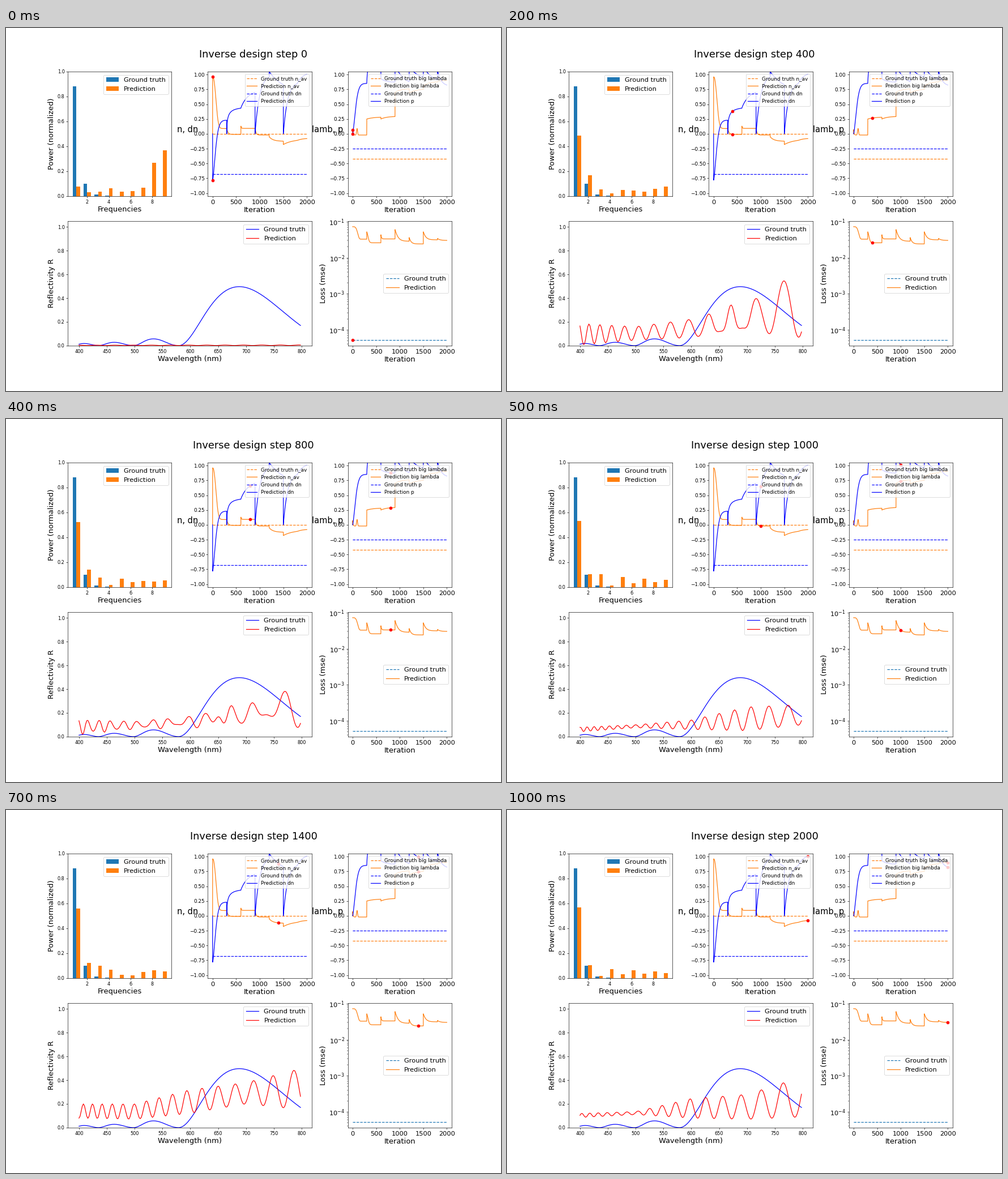
Animation of 874 by 641 pixels, one loop 1100 ms. Source, as a matplotlib script:

```python
import numpy as np
import matplotlib.pyplot as plt
from matplotlib.animation import FuncAnimation

plt.rcParams["font.family"] = "DejaVu Sans"
ORANGE, BLUE = "tab:orange", "blue"
GT_LOSS = 5.25e-5
WAVE = np.arange(400, 800, 2.0)
KNOTS = [400, 500, 600, 700, 800]
FREQ = np.arange(1, 10)
BAR = 0.35
ITER = np.arange(2001)
RESTART = 300


def lobes():
    """Reflectivity of the true grating: squared sines between its zeros."""
    zeros = np.array([897, 579, 498, 435, 388.0])
    turn = np.interp(WAVE ** -2, zeros ** -2, range(5))
    peak = np.array([.497, .057, .028, .018])[turn.astype(int)]
    s = np.sin(np.pi * turn) ** 2
    return peak * 1.15 * s / (1 + .15 * s)


def fringes(low, high, first, last, count, p, beat=0):
    """Thin-film fringes between two envelopes, `count` orders from first to last."""
    order = count * (WAVE ** -p - last ** -p) / (first ** -p - last ** -p)
    lo, hi = np.interp(WAVE, KNOTS, low), np.interp(WAVE, KNOTS, high)
    window = beat * np.exp(-((WAVE - 675) / 35) ** 2)
    return (lo + (hi - lo) * np.cos(np.pi * order) ** 2
            + window * np.cos(4 * np.pi * order))


def spread(first, second, swing, peak, period):
    """Two leading powers; the rest is shared out with a fading ripple."""
    k = FREQ[2:]
    ripple = np.cos(2 * np.pi * (k - peak) / period) * np.exp((3 - k) / 4)
    return np.r_[first, second, (1 - first - second) / 7 + swing * ripple]


def relax(*stages):
    """Each restart decays from start to end: (start, end, time, power)."""
    stage = np.maximum(ITER - 1, 0) // RESTART
    t = np.maximum(ITER - 1, 0) % RESTART
    start, end, tau, power = np.array([(*s, 1)[:4] for s in stages])[stage].T
    return end + (start - end) * np.exp(-(t / tau) ** power)


truth = lobes()
spectra = {
    0: .001 + .005 * np.sin((WAVE - 415) / 10.5) ** 2 * WAVE / 800,
    200: fringes([.03, .01, .02, .045, .12], [.08, .16, .235, .36, .72],
                 402, 764, 12, .7),
    600: fringes([-.01, .05, .08, .14, .05], [.22, .165, .22, .33, .64],
                 416, 766, 11, .7, .05),
    1000: fringes([.04, .075, .06, .05, .1], [.08, .1, .14, .25, .27],
                  600, 774, 6, .7),
    1400: fringes([.08, .07, .12, .2, .15], [.2, .2, .32, .38, .5],
                  408, 786, 15, .35),
    1600: fringes([.03, .065, .07, .09, .085], [.12, .11, .14, .23, .28],
                  416, 771, 13, -.7),
    2000: fringes([.085, .11, .08, .07, .09], [.12, .135, .245, .28, .43],
                  417.6, 765, 14, .7),
}
powers = {
    0: (.045 + .03 * np.cos(2 * np.pi * (FREQ - 1) / 3) * np.exp((1 - FREQ) / 6)
        + .33 / (1 + np.exp(-4 * (FREQ - 7.8)))),
    200: .02 + .36 * .3 ** (FREQ - 1) + .175 * .42 ** (9 - FREQ),
    600: spread(.51, .18, .03, 5.4, 3),
    1000: spread(.532, .103, .05, 3, 2.1),
    1400: spread(.558, .12, .055, 3.2, 5),
    1600: spread(.59, .07, .05, 5.1, 2.5),
    2000: spread(.566, .103, .03, 4, 2),
}
for step, a, b, w in [(400, 200, 600, .8), (800, 600, 1000, .5),
                      (1200, 1000, 1400, .2), (1800, 1600, 2000, .25)]:
    for d in (spectra, powers):
        d[step] = (1 - w) * d[a] + w * d[b]

n_av = relax((.96, .09, 88, 2.4), (.09, -.01, 25), (.13, .092, 10),
             (.1, -.02, 20), (-.05, -.125, 80), (-.18, -.09, 200),
             (-.11, -.075, 100))
dn = relax((-.78, .23, 80, 1.5), (0, .45, 29, .5), (.44, .74, 150),
           (0, 1, 95), (1.05, .7, 300), (0, .88, 90), (.86, 1.04, 120))
lamb = relax((.07, -.02, 10), (.25, .285, 150), (.25, .295, 120),
             (.7, .77, 150), (.69, .76, 150), (.8, .88, 100), (.88, .9, 60))
lamb += .11 * np.exp(-((ITER - 95) / 15) ** 2)
p = relax((0, .85, 80, 1.5), (.85, 1.15, 15), (.93, .87, 100), (1.15, .8, 200),
          (1.15, .93, 150), (1.15, .88, 150), (1.07, .8, 80))
loss = relax((.072, .0325, 108, 4), (.052, .0258, 32, 1.5), (.043, .033, 12),
             (.06, .0285, 50), (.036, .024, 35), (.052, .0312, 45),
             (.034, .03, 50))
for curve in (n_av, dn, lamb, p):
    curve[0] = 0

fig = plt.figure(figsize=(15, 11), dpi=58.274, facecolor="white")
grid = fig.add_gridspec(2, 3, left=.125, right=.9, bottom=.125, top=.88,
                        wspace=.35, hspace=.2)
title = fig.suptitle("", fontsize=22, y=.94)


def panel(cell, xlabel, ylabel, **ylabel_style):
    ax = fig.add_subplot(cell)
    ax.set_xlabel(xlabel, fontsize=16, labelpad=2.5)
    ax.set_ylabel(ylabel, **{"fontsize": 16, **ylabel_style})
    return ax


def iteration_axis(ax):
    ax.set_xlim(-100, 2100)
    ax.set_xticks(range(0, 2001, 500))
    ax.tick_params(axis="x", labelsize=14)


def history(cell, ylabel, series):
    """Panel with (name, curve, true value, color) for two parameters."""
    ax = panel(cell, "Iteration", ylabel, fontsize=18, rotation=0)
    for name, curve, true, color in series:
        ax.plot([0, 2000], [true, true], "--", color=color,
                label="Ground truth " + name)
        ax.plot(ITER, curve, color=color, label="Prediction " + name)
    iteration_axis(ax)
    ax.set_ylim(-1.05, 1.05)
    ax.set_yticks(np.linspace(-1, 1, 9))
    ax.tick_params(axis="y", labelsize=11)
    ax.legend(loc="upper right", fontsize=11)
    return [ax.plot([], [], "ro")[0] for _ in series]


ax = panel(grid[0, 0], "Frequencies", "Power (normalized)")
ax.bar(FREQ - BAR / 2, np.maximum(.88 * .113 ** (FREQ - 1), .02 * .6 ** FREQ),
       BAR, label="Ground truth")
bars = ax.bar(FREQ + BAR / 2, powers[0], BAR, label="Prediction")
ax.set_ylim(0, 1)
ax.set_xticks([2, 4, 6, 8])
ax.legend(loc="upper right", fontsize=14)

n_dots = history(grid[0, 1], "n, dn", [("n_av", n_av, 0, ORANGE),
                                       ("dn", dn, -.68, BLUE)])
p_dots = history(grid[0, 2], "lamb, p", [("big lambda", lamb, -.42, ORANGE),
                                         ("p", p, -.25, BLUE)])
dots = list(zip(n_dots + p_dots, (n_av, dn, lamb, p)))

ax = panel(grid[1, :2], "Wavelength (nm)", "Reflectivity R")
ax.plot(WAVE, truth, color=BLUE, label="Ground truth")
red, = ax.plot(WAVE, spectra[0], color="red", label="Prediction")
ax.set_ylim(0, 1.05)
ax.legend(loc="upper right", fontsize=14)

ax = panel(grid[1, 2], "Iteration", "Loss (mse)")
ax.plot([0, 2000], [GT_LOSS] * 2, "--", label="Ground truth")
ax.plot(ITER, loss, label="Prediction")
ax.set_yscale("log")
ax.set_ylim(3.65e-5, .1033)
iteration_axis(ax)
ax.tick_params(axis="y", labelsize=14)
ax.legend(loc="center right", fontsize=14)
loss_dot, = ax.plot([], [], "ro")


def update(i):
    step = 200 * i
    title.set_text(f"Inverse design step {step}")
    for bar, height in zip(bars, powers[step]):
        bar.set_height(height)
    red.set_ydata(spectra[step])
    for dot, curve in dots:
        dot.set_data([step], [curve[max(step, 1)]])
    loss_dot.set_data([step], [loss[step] if step else GT_LOSS])


anim = FuncAnimation(fig, update, frames=11, interval=100, repeat=True)
plt.show()
```
